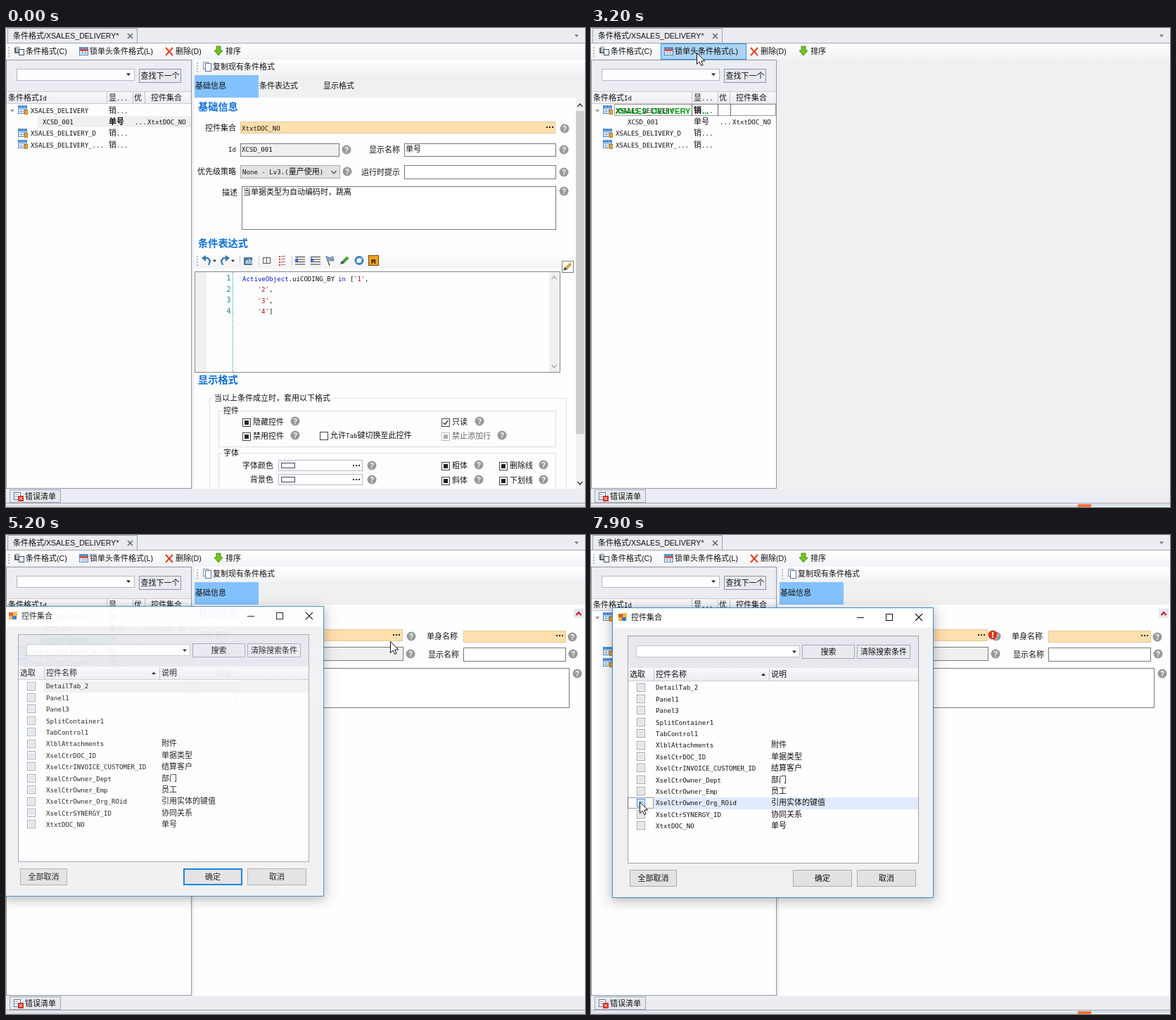
Animation, 823 px wide and 681 px high, one loop 8000 ms. Source, as an HTML page with a canvas:

```html
<!DOCTYPE html>
<html lang="zh">
<head>
<meta charset="utf-8">
<style>
html, body { margin: 0; width: 100%; height: 100%; overflow: hidden; background: #ebedf2; }
canvas { display: block; }
</style>
</head>
<body>
<canvas id="stage" width="823" height="681"></canvas>
<script>
const ctx = document.getElementById('stage').getContext('2d');
const LOOP = 8000, ROW = 16.4;
const CJK = '"Noto Sans CJK SC", "Noto Sans CJK", sans-serif';
const MONO = '"DejaVu Sans Mono", monospace', SANS = '"Liberation Sans", sans-serif';
const GREEN = '#009a10', PEACH = '#ffdfad', EDGE = '#777', FAINT = '#c6c8ce';

// Rectangle given by its corners, with an optional crisp 1px outline.
function box(x, y, x2, y2, fill, stroke, dash = []) {
  if (fill) { ctx.fillStyle = fill; ctx.fillRect(x, y, x2 - x, y2 - y); }
  if (stroke) {
    ctx.strokeStyle = stroke; ctx.lineWidth = 1; ctx.setLineDash(dash);
    ctx.strokeRect(x + .5, y + .5, x2 - x - 1, y2 - y - 1);
    ctx.setLineDash([]);
  }
}
function shade(x, y, x2, y2, top, bottom) {
  const g = ctx.createLinearGradient(0, y, 0, y2);
  g.addColorStop(0, top); g.addColorStop(1, bottom);
  box(x, y, x2, y2, g);
}
function line(points, color, width = 1) {
  ctx.beginPath();
  points.forEach(([x, y]) => ctx.lineTo(x, y));
  ctx.strokeStyle = color; ctx.lineWidth = width; ctx.stroke();
}
function poly(points, fill, stroke) {
  ctx.beginPath();
  points.forEach(([x, y]) => ctx.lineTo(x, y));
  ctx.closePath();
  ctx.fillStyle = fill; ctx.fill();
  if (stroke) { ctx.strokeStyle = stroke; ctx.lineWidth = 1; ctx.stroke(); }
}
function disc(x, y, r, color) {
  ctx.beginPath(); ctx.arc(x, y, r, 0, 7);
  ctx.fillStyle = color; ctx.fill();
}
// Chinese and Latin runs use separate fonts; y is the middle of the line.
function text(s, x, y, { color = '#111', size = 11, latin = MONO, bold = false } = {}) {
  ctx.fillStyle = color;
  for (const run of s.match(/[ -~]+|[^ -~]+/g)) {
    const ascii = run[0] <= '~';
    const px = ascii ? size * (latin === MONO ? .828 : .965) : size;
    ctx.font = `${bold ? 'bold ' : ''}${px}px ${ascii ? latin : CJK}`;
    ctx.fillText(run, x, y + size * .36);
    x += ctx.measureText(run).width;
  }
}
const ui = (s, x, y, color) => text(s, x, y, { latin: SANS, color });
const green = (s, x, y) => text(s, x, y, { latin: SANS, bold: true, color: GREEN, size: 11.6 });
const heading = (s, y, color) => text(s, 273, y, { size: 14.2, bold: true, color });
const down = (x, y, color = '#222', r = 3) => poly([[x - r, y - r / 2], [x + r, y - r / 2], [x, y + r / 2 + .5]], color);
const chevron = (x, y, dir, color, width = 1.3) => line([[x - 3.5, y - 2 * dir], [x, y + 2 * dir], [x + 3.5, y - 2 * dir]], color, width);
function dots(x, y, color = '#222') { for (let i = -1; i < 2; i++) box(x + i * 4 - 1, y - 1, x + i * 4 + 1, y + 1, color); }
function grip(x, y) { for (let i = 0; i < 4; i++) box(x, y - 6 + i * 4, x + 2, y - 4 + i * 4, '#b5b8c0'); }
function help(x, y) {
  disc(x, y, 6.5, '#999');
  ctx.textAlign = 'center';
  text('?', x, y, { color: '#fff', latin: SANS, bold: true, size: 10.5 });
  ctx.textAlign = 'left';
}
function button(label, x, y, x2, y2, fill, stroke) {
  box(x, y, x2, y2, fill, stroke);
  ui(label, (x + x2 - label.length * 11) / 2, (y + y2) / 2);
}
function pencil(x, y, color) {
  line([[x - 4, y + 4], [x + 4, y - 4]], color, 4);
  poly([[x - 7, y + 6], [x - 5, y + 1], [x - 1, y + 4]], '#444');
}
function pages(x, y) {
  box(x, y, x + 8, y + 11, '#fff', '#7b8caa');
  box(x + 3, y + 2, x + 12, y + 14, '#fff', '#5b759e');
}
function table(x, y, accent) {
  box(x, y, x + 13, y + 12, '#fff', '#4a7fb8');
  box(x, y, x + 13, y + 4, '#4b8fd4');
  for (let i = 1; i < 3; i++) {
    box(x + i * 4, y, x + i * 4 + 1, y + 12, '#88acd3');
    box(x, y + 2 + i * 3, x + 13, y + 3 + i * 3, '#88acd3');
  }
  if (accent === 'red') box(x + 1, y + 3, x + 13, y + 6, '#d75050');
  else box(x + 9, y + 6, x + 14, y + 13, '#efa63c', '#b87918');
}
function field(x, y, x2, y2, value = '', fill = '#fff', edge = EDGE) {
  box(x, y, x2, y2, fill, fill === PEACH ? '#e2c79c' : edge);
  if (value) text(value, x + 2, y + 8);
}

function windowFrame(lit) {
  box(0, 0, 823, 681, '#ebedf2');
  shade(0, 22, 823, 45, '#fff', '#f1f2f5');
  box(0, 21, 823, 22, '#a4a8b2');
  box(2, 0, 187, 22, '#e9ebf0', '#9fa3ae');
  ui('条件格式/XSALES_DELIVERY*', 10, 11);
  line([[173, 8], [180, 15]], '#666', 1.6); line([[180, 8], [173, 15]], '#666', 1.6);
  down(811, 11, '#777');
  grip(3, 33);
  if (lit) box(99, 22, 221, 45, '#acd4f2', '#3c94db');
  disc(16, 30, 4, '#bbb'); box(18, 30, 26, 39, '#f5f7fa', '#38506f'); line([[13, 28], [13, 35], [18, 35]], '#333', 1.5);
  table(104, 27, 'red');
  line([[227, 28], [237, 39]], '#e0401f', 2); line([[237, 28], [227, 39]], '#e0401f', 2);
  poly([[299, 26], [305, 26], [305, 32], [308, 32], [302, 39], [296, 32], [299, 32]], '#76c31c', '#448c13');
  ui('条件格式(C)', 28, 33); ui('锁单头条件格式(L)', 119, 33);
  ui('删除(D)', 241, 33); ui('排序', 312, 33);
}

function leftPanel(stage, flash) {
  box(0, 45, 264, 655, '#fefefe', '#9297a5');
  box(1, 46, 263, 90, '#ebedf2');
  box(15, 58, 183, 75, '#fff', '#b3b8c5'); down(174, 66);
  button('查找下一个', 189, 58, 249, 78, '#e7e9ef', '#8d94a6');
  shade(1, 90, 263, 108, '#fafafb', '#ebecf0');
  box(1, 90, 263, 91, '#c9ccd4'); box(1, 107, 263, 108, '#c9ccd4');
  for (const x of [143, 180, 197]) box(x, 91, x + 1, 107, '#bfc3cc');
  text('条件格式Id', 3, 99); text('显...', 146, 99); text('优', 182, 99); text('控件集合', 206, 99);

  poly([[6, 116], [12, 116], [9, 120]], '#999');
  const node = (name, y) => { table(17, Math.round(y) - 7); text(name, 35, y); text('销...', 146, y); };
  const shift = stage === 'added' ? ROW : 0;
  node('XSALES_DELIVERY', 117);
  if (stage === 'form') box(45, 125, 263, 141, '#efeff0');
  text('XCSD_001', 52, 133);
  text('单号', 146, 133, { bold: stage === 'form' || stage === 'leaving' });
  text('...', 183, 133); text('XtxtDOC_NO', 201, 133);
  node('XSALES_DELIVERY_D', 149.5 + shift);
  node('XSALES_DELIVERY_...', 166 + shift);

  if (stage === 'leaving') {
    box(143, 125, 180, 142, null, '#333', [1, 1]);
    green('XCSD_001', 52, 134); green('...', 183, 134); green('XtxtDOC...', 201, 134);
  } else if (stage === 'empty') {
    for (const [a, b] of [[33, 144], [143, 181], [180, 199], [198, 263]]) box(a, 108, b, 125, null, '#333', [1, 1]);
    text('销', 146, 117, { bold: true });
    green('XSALES_DELIVERY', 35, 118); green('...', 158, 118);
  } else if (stage === 'added') {
    if (flash) box(50, 142, 143, 157, '#7fd09a');
    ctx.save();
    ctx.beginPath(); ctx.rect(50, 140, 93, 20); ctx.clip();
    text('XSALES_DELIVERY_D', 35, 149.5);
    ctx.restore();
    text('销...', 146, 149.5);
    box(49, 141, 144, 158, null, '#333', [1, 1]);
    green('XCSD_002', 52, 150); green('...', 183, 150);
  }
}

function rightHeader(tabs, ink) {
  box(267, 45, 823, 655, '#fefefe');
  shade(267, 45, 823, 67, '#fff', '#f1f2f4');
  grip(271, 55); pages(280, 48);
  text('复制现有条件格式', 294, 55, { color: ink });
  box(267, 67, 823, 99, '#f0f0f0');
  box(268, 67, 359, 99, '#84c1ff');
  tabs.forEach((name, i) => text(name, 269 + i * 91, 82));
}

function editorToolbar() {
  shade(268, 320, 787, 342, '#fff', '#f1f2f5');
  grip(271, 330);
  for (const [x, dir] of [[285, 1], [311, -1]]) {
    line([[x + 3 * dir, 337], [x + 5 * dir, 331], [x + 2 * dir, 327], [x - 3 * dir, 327]], '#3276b8', 2.2);
    poly([[x - 7 * dir, 327], [x - 1 * dir, 323], [x - 1 * dir, 332]], '#3276b8');
    down(x + 11.5, 331, '#222', 2.5);
  }
  for (const x of [332, 359, 406]) box(x, 324, x + 1, 338, '#c8cbd2');
  box(338, 326, 350, 337, '#4d7599'); text('ab', 340, 332, { color: '#fff', bold: true, size: 9, latin: SANS });
  box(365, 326, 371, 335, '#fff', '#555'); box(370, 326, 376, 335, '#fff', '#555');
  for (let i = 0; i < 4; i++) {
    box(388, 324 + i * 4, 390, 326 + i * 4, '#c33'); box(391, 324 + i * 4, 397, 325 + i * 4, '#b66');
    for (const x of [411, 433]) box(x, 325 + i * 3.5, x + 14, 326 + i * 3.5, '#333');
  }
  poly([[410, 330], [415, 326], [415, 334]], '#2c72c8'); poly([[438, 330], [433, 326], [433, 334]], '#2c72c8');
  line([[455, 324], [460, 338]], '#555', 1.5); poly([[455, 324], [460, 326], [465, 324], [467, 331], [462, 332], [457, 330]], '#7f9dbd');
  pencil(482, 330, '#4b9e3b');
  ctx.beginPath(); ctx.arc(502, 330.5, 5, 0, 7); ctx.strokeStyle = '#3c80bd'; ctx.lineWidth = 3; ctx.stroke();
  line([[498, 333], [506, 327]], '#d9e9f6', 1.5);
  box(515, 323, 530, 338, '#f6a21b', '#6b4512');
  text('R', 519, 331, { bold: true, latin: SANS, size: 10 });
}

function check(x, y, label, mark, off, labelColor = '#111') {
  const c = off ? '#aaa' : '#222';
  box(x, y - 5, x + 12, y + 7, '#fff', off ? '#bbb' : '#444');
  if (mark === 'square') box(x + 3, y - 2, x + 9, y + 4, c);
  if (mark === 'tick') line([[x + 2.5, y + 1], [x + 5, y + 3.5], [x + 9.5, y - 2]], c, 1.2);
  text(label, x + 15, y, { color: labelColor });
}
function group(label, x, y, x2, y2, color) {
  box(x, y, x2, y2, null, '#dcdcdc');
  box(x + 5, y - 1, x + 9 + label.length * 11, y + 2, '#fefefe');
  text(label, x + 7, y, { color });
}

function fullForm(off) {
  const ink = off ? '#555' : '#111', pale = off ? '#999' : '#111', title = off ? '#333' : '#0d6ed8';
  const edge = off ? FAINT : EDGE;
  const label = (s, x, y) => text(s, x, y, { color: ink });
  rightHeader(['基础信息', '条件表达式', '显示格式'], pale);
  heading('基础信息', 112, title);
  label('控件集合', 283, 142); field(333, 133, 781, 150, '', PEACH);
  text('XtxtDOC_NO', 335, 142, { color: pale }); dots(773, 141, off ? '#c9b490' : '#222'); help(794, 143);
  label('Id', 316, 172); field(333, 164, 474, 183, 'XCSD_001', '#f0f0f0', edge); help(484, 173);
  label('显示名称', 516, 173); field(566, 164, 782, 183, '单号', '#fff', edge); help(793, 173);
  label('优先级策略', 272, 204); box(333, 195, 475, 214, '#e2e2e2', '#aaa');
  text('None - Lv3.(量产使用)', 336, 204); chevron(466, 205, 1, '#555'); help(485, 204);
  label('运行时提示', 505, 205); field(566, 195, 782, 215, '', '#fff', edge); help(793, 205);
  label('描述', 307, 234); field(335, 225, 782, 287, '当单据类型为自动编码时，跳离', '#fff', edge); help(793, 232);

  heading('条件表达式', 306, title);
  if (off) ctx.filter = 'grayscale(1) opacity(.6)';
  editorToolbar();
  ctx.filter = 'none';
  const paper = off ? '#f0f0f0' : '#fefefe';
  box(268, 346, 788, 490, paper, '#888');
  box(269, 347, 285, 489, '#f0f0f0'); box(772, 347, 787, 489, '#f0f0f0');
  chevron(779, 355, -1, '#aaa'); chevron(779, 481, 1, '#aaa');
  for (let y = 347; y < 489; y += 3) box(322, y, 323, y + 1.5, '#1d9c9c');
  const code = (s, x, y, color) => text(s, x, y, { color });
  for (let i = 0; i < 4; i++) text(`${i + 1}`, 313.5, 355 + i * 15.4, { color: '#128585', size: 12 });
  code('ActiveObject', 336, 356, '#1515d0'); code('.uiCODING_BY', 401.5, 356, '#111');
  code('in', 472, 356, '#1515d0'); code('[', 489, 356, '#111');
  code("'1'", 494, 356, '#a11'); code(',', 510, 356, '#111');
  for (let i = 1; i < 4; i++) {
    code(`'${i + 1}'`, 357.5, 356 + i * 15.4, '#a11');
    code(i < 3 ? ',' : ']', 374, 356 + i * 15.4, '#111');
  }
  box(790, 331, 807, 348, '#fff', '#777'); pencil(799, 339, '#dfa13d');

  heading('显示格式', 500, title);
  group('当以上条件成立时，套用以下格式', 289, 526, 797, 700, pale);
  group('控件', 302, 544, 782, 596, pale);
  group('字体', 302, 604, 782, 700, pale);
  check(336, 560, '隐藏控件', 'square', off); help(411, 559);
  check(336, 580, '禁用控件', 'square', off); help(411, 579);
  check(446, 579, '允许Tab键切换至此控件', '', off);
  check(619, 560, '只读', 'tick', off); help(673, 559);
  check(619, 580, '禁止添加行', 'square', true, off ? '#111' : '#666'); help(705, 579);
  ['字体颜色', '背景色'].forEach((name, i) => {
    const y = 622 + i * 20;
    text(name, 380 - name.length * 11, y);
    box(387, y - 8, 507, y + 8, off ? '#edeff4' : '#fff', '#b5bac6');
    box(391, y - 4, 411, y + 4, '#fff', '#434068'); dots(498, y, off ? '#bbb' : '#222'); help(520, y);
  });
  ['粗体', '斜体'].forEach((name, i) => { check(619, 622 + i * 21, name, 'square', off); help(672, 621 + i * 21); });
  ['删除线', '下划线'].forEach((name, i) => { check(701, 622 + i * 21, name, 'square', off); help(764, 621 + i * 21); });

  box(810, 99, 823, 655, '#f0f0f0'); box(810, 118, 822, 577, '#cdcdcd');
  chevron(816, 110, -1, '#444', 1.6); chevron(816, 647, 1, '#444', 1.6);
}

function shortForm(error) {
  rightHeader(['基础信息']);
  heading('基础信息', 112, '#0d6ed8');
  box(807, 105, 821, 118, '#e6e7ec'); chevron(814, 112, -1, '#c5202c', 2.2);
  text('控件集合', 275, 142); field(325, 134, 564, 151, '', PEACH); dots(555, 142); help(576, 144);
  if (error) {
    disc(571, 142, 6.5, '#d8391b');
    box(570, 138, 572, 143, '#fff'); box(570, 144, 572, 146, '#fff');
  }
  text('单身名称', 598, 144); field(650, 136, 796, 153, '', PEACH); dots(787, 143); help(805, 145);
  text('Id', 308, 168); field(325, 159, 565, 179, 'XCSD_002', '#f0f0f0'); help(575, 169);
  text('显示名称', 600, 170); field(650, 160, 796, 180); help(806, 169);
  text('描述', 299, 198); field(327, 189, 801, 246); help(812, 197);
}

const CONTROLS = [['DetailTab_2'], ['Panel1'], ['Panel3'], ['SplitContainer1'], ['TabControl1'],
  ['XlblAttachments', '附件'], ['XselCtrDOC_ID', '单据类型'], ['XselCtrINVOICE_CUSTOMER_ID', '结算客户'],
  ['XselCtrOwner_Dept', '部门'], ['XselCtrOwner_Emp', '员工'], ['XselCtrOwner_Org_ROid', '引用实体的键值'],
  ['XselCtrSYNERGY_ID', '协同关系'], ['XtxtDOC_NO', '单号']];

function dialogFace(picked) {
  box(0, 0, 457, 413, '#f0f0f0');
  box(0, 0, 457, 29, '#fff');
  box(0, 0, 457, 413, null, '#3c8cc8');
  box(9, 9, 15, 15, '#e2552f'); box(15, 8, 21, 14, '#f0b93d');
  box(9, 14, 14, 19, '#efb53a'); box(14, 14, 20, 19, '#3a6fc9');
  ui('控件集合', 27, 14);
  box(348, 14, 358, 15, '#111'); box(389, 9, 399, 19, null, '#111');
  line([[431, 9], [441, 19]], '#111', 1.1); line([[441, 9], [431, 19]], '#111', 1.1);

  box(22, 40, 436, 364, '#fefefe', '#9da2af');
  box(23, 41, 435, 86, '#e6e8ed');
  box(34, 54, 267, 71, '#fff', '#c2c6d0'); down(259, 63);
  button('搜索', 270, 53, 345, 73, '#e8eaef', '#a3a9b7');
  button('清除搜索条件', 348, 53, 424, 73, '#e8eaef', '#a3a9b7');
  shade(23, 86, 435, 105, '#f9f9fb', '#ebecf0');
  box(23, 104, 435, 105, '#c9ccd4');
  box(59, 87, 60, 104, '#bfc3cc'); box(223, 87, 224, 104, '#bfc3cc');
  text('选取', 25, 95); text('控件名称', 62, 95); text('说明', 226, 95);
  poly([[212, 97], [218, 97], [215, 93.5]], '#222');
  const active = picked ? 10 : 0;
  CONTROLS.forEach(([name, note], i) => {
    const rowY = 113.5 + i * ROW, top = Math.round(rowY - 8);
    if (i === active) {
      box(59, top, 435, top + 17, picked ? '#e1ebfd' : '#f0f0f1');
      if (picked) box(22, top, 59, top + 16, null, '#333', [1, 1]);
    }
    box(35, top + 2, 47, top + 14, '#fff', picked && i === active ? '#3f80d8' : '#9ba1b0');
    box(37, top + 4, 45, top + 12, picked && i === active ? '#bcd6f7' : '#e3e5eb');
    text(name, 62, rowY);
    if (note) text(note, 226, rowY);
  });
  button('全部取消', 25, 373, 92, 397, '#e2e2e2', '#adadad');
  button('确定', 257, 373, 341, 397, '#e2e2e2', picked ? '#adadad' : '#0078d7');
  if (!picked) box(258, 374, 340, 396, null, '#0078d7');
  button('取消', 348, 373, 432, 397, '#e2e2e2', '#adadad');
}

// Fading repaints what lies behind as a thin veil over the opaque window.
function dialog(x, y, opacity, picked, paintBehind) {
  ctx.save();
  ctx.translate(x, y);
  ctx.beginPath(); ctx.roundRect(-19, -2, 494, 432, 14);
  ctx.fillStyle = 'rgba(0,0,0,.012)'; ctx.fill();
  ctx.shadowColor = `rgba(0,0,0,${.3 * opacity})`; ctx.shadowBlur = 14; ctx.shadowOffsetY = 3;
  box(0, 0, 457, 413, '#f0f0f0');
  ctx.shadowColor = 'transparent';
  dialogFace(picked);
  if (opacity < 1) {
    ctx.beginPath(); ctx.rect(0, 0, 457, 413); ctx.clip();
    ctx.translate(-x, -y);
    ctx.globalAlpha = 1 - opacity;
    paintBehind();
  }
  ctx.restore();
}

function bottomBar(popup) {
  box(0, 655, 823, 681, '#ebedf2');
  box(5, 656, 78, 675, '#e7e9ee', '#9fa4b1');
  box(0, 675, 823, 676, '#a0a4af'); box(0, 676, 823, 679, '#e6e8ed'); box(0, 679, 823, 681, '#d9dce3');
  box(11, 660, 21, 671, '#fff', '#5878a4');
  box(13, 663, 17, 664, '#7896bd'); box(13, 666, 17, 667, '#7896bd');
  box(17, 665, 25, 673, '#d9322b');
  line([[19, 667], [23, 671]], '#fff'); line([[23, 667], [19, 671]], '#fff');
  ui('错误清单', 27, 666);
  if (popup) {
    box(710, 678, 823, 681, '#fff'); box(710, 678, 823, 679, '#a9c4de');
    box(692, 677, 711, 681, '#f2703a');
  }
}

// Pointer stops: time, x, y
const PATH = [[600, 714, 30], [1400, 117, 116], [1600, 118, 116], [2300, 148, 35], [3100, 148, 35], [3200, 150, 35],
  [3800, 157, 45], [4000, 147, 58], [4800, 546, 151], [5300, 546, 151], [5700, 271, 127], [5800, 271, 127],
  [5900, 285, 128], [6000, 300, 129], [6100, 306, 129], [6700, 252, 405], [7600, 68, 379], [7700, 69, 379]];
function pointerAt(t) {
  const i = PATH.findIndex(p => p[0] > t);
  if (i < 0) return PATH[PATH.length - 1].slice(1);
  const [t0, x0, y0] = PATH[i - 1], [t1, x1, y1] = PATH[i];
  const p = (t - t0) / (t1 - t0), k = p * p * (3 - 2 * p);
  return [Math.round(x0 + (x1 - x0) * k), Math.round(y0 + (y1 - y0) * k)];
}
function pointer([x, y]) {
  const shape = [[0, 0], [0, 16], [3.6, 12.6], [6.2, 18], [8.6, 17], [6.2, 11.6], [11.2, 11.4]];
  poly(shape.map(([a, b]) => [x + a + .5, y + b + .5]), '#fff', '#111');
}

function draw(t) {
  const stage = t < 1500 ? 'form' : t < 1700 ? 'leaving' : t < 3500 ? 'empty' : 'added';
  const paintWindow = () => {
    windowFrame(t >= 2200 && t < 3900);
    leftPanel(stage, t >= 3900);
    if (stage === 'empty') box(265, 45, 823, 655, '#f0f0f0');
    else if (stage === 'added') shortForm(t >= 6400 || t >= 5400 && (t - 5400) % 500 < 300);
    else fullForm(stage === 'leaving');
    bottomBar(t >= 1500 && t < 4400 || t >= 7900);
  };
  paintWindow();
  if (t >= 5000) {
    const x = t < 5900 ? -5 : t < 6000 ? 9 : t < 6100 ? 24 : 30;
    const opacity = t < 5100 ? .35 : t < 5200 ? .75 : t < 5300 ? .95 : 1;
    dialog(x, t < 5900 ? 101 : 103, opacity, t >= 7900, paintWindow);
  }
  if (t >= 600) pointer(pointerAt(t));
}

const start = performance.now();
function tick() {
  const t = (performance.now() - start) % LOOP;
  draw(Math.floor(t / 100) * 100);
  requestAnimationFrame(tick);
}
tick();
</script>
</body>
</html>
```
